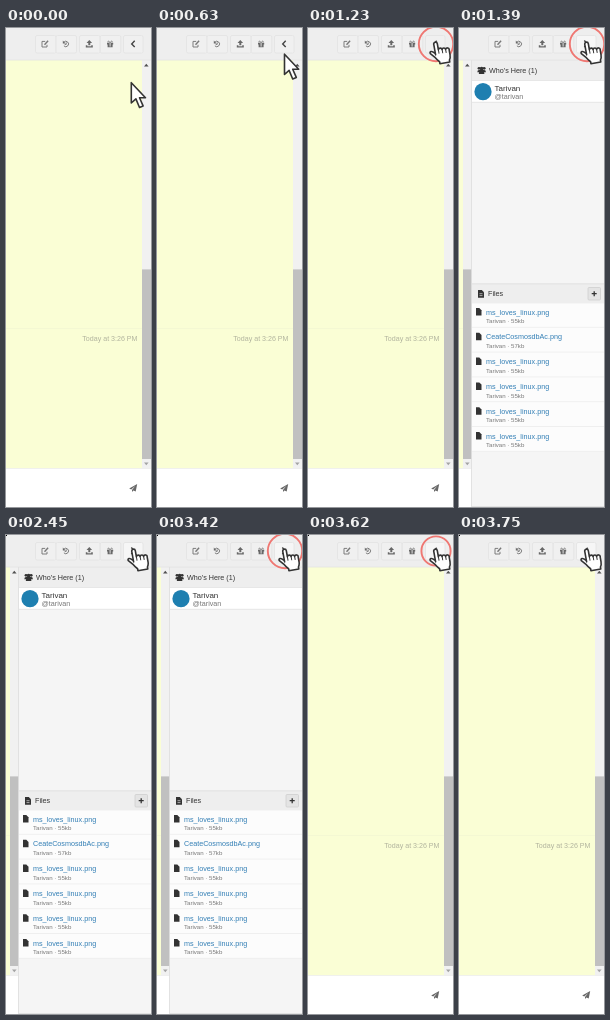
Animation, 145 px wide and 479 px high, one loop 4430 ms. Source, as an HTML page:

```html
<!DOCTYPE html>
<html lang="en">
<head>
<meta charset="utf-8">
<title>Chat side panel</title>
<style>
  html, body { margin: 0; width: 100%; height: 100%; overflow: hidden; background: #fff; }
  svg { display: block; width: 100%; height: 100%; }
  text { font-family: "Liberation Sans", Arial, sans-serif; font-size: 7.2px; fill: #333; }
  .line { fill: none; stroke: #777; stroke-width: .95; }
  .solid { fill: #686868; }
  .button { fill: #f0f0f0; stroke: #e3e3e3; stroke-width: .8; }
  .link { fill: #337fb5; }
  .small { font-size: 6.1px; fill: #777; }
  .pointer { fill: #fff; stroke: #333; stroke-width: 1.6; stroke-linejoin: round; }
</style>
</head>
<body>
<svg viewBox="0 0 145 479" preserveAspectRatio="none">
  <rect width="145" height="479" fill="#fff"/>

  <g id="chat">
    <rect y="32" width="136" height="408.5" fill="#fafed5"/>
    <path d="M0 300.5H136" stroke="#f4f8d3"/>
    <text x="76.3" y="312.5" style="font-size:7.1px;fill:#b2b49e">Today at 3:26 PM</text>
    <rect x="136" y="32" width="9" height="408.5" fill="#f1f1f1"/>
    <rect x="136" y="241.4" width="9" height="189.6" fill="#c0c0c0"/>
    <path d="M138 38.5l2.3-2.8 2.3 2.8z" fill="#505050"/>
    <path d="M138 434.4l2.3 2.8 2.3-2.8z" fill="#a3a3a3"/>
    <path d="M0 440.5H145" stroke="#eee" stroke-width=".8"/>
    <path class="solid" d="M131.2 456l-8 4.6 2 .9 4-3.5-3.2 4v2l1.4-1.5 2.3 1z"/>
  </g>

  <g id="panel">
    <rect x="12.5" y="32" width="134" height="446.5" fill="#f5f5f5" stroke="#ddd" stroke-width=".8"/>
    <rect x="13" y="32.5" width="132" height="20" fill="#eee"/>
    <rect x="13" y="52.5" width="132" height="21.5" fill="#fff"/>
    <path d="M13 52.5H145M13 74.3H145" stroke="#e4e4e4" stroke-width=".8"/>
    <g fill="#333">
      <circle cx="20" cy="40.3" r="1.4"/><circle cx="25.2" cy="40.3" r="1.4"/>
      <circle cx="22.6" cy="40.6" r="1.9"/>
      <path d="M18.3 44.3q0-2.4 1.7-2.4h5.2q1.7 0 1.7 2.4z"/>
      <path d="M19.8 46q0-3.3 2.8-3.3t2.8 3.3z"/>
    </g>
    <text x="30" y="44.8">Who's Here (1)</text>
    <circle cx="24" cy="63.7" r="8.6" fill="#1e7fb0"/>
    <text x="35.5" y="62.5" style="font-size:8px">Tarivan</text>
    <text x="35.5" y="71" style="fill:#777">@tarivan</text>

    <rect x="13" y="256" width="132" height="19.5" fill="#eee"/>
    <path d="M13 255.8H145" stroke="#ddd" stroke-width=".8"/>
    <path d="M19 262h3.8l2.2 2.2v5.6h-6z" fill="#333"/>
    <path d="M20.5 265.7h3M20.5 267.6h3" stroke="#ddd" stroke-width=".7"/>
    <text x="29" y="268.4">Files</text>
    <rect x="129" y="259.5" width="12.5" height="12.5" rx="1" fill="#e4e4e4" stroke="#ccc" stroke-width=".7"/>
    <path d="M132.7 265.7h5M135.2 263.2v5" stroke="#333" stroke-width="1.3"/>
    <rect x="13" y="275.5" width="132" height="148" fill="#fcfcfc"/>
    <g id="files"></g>
  </g>

  <rect width="145" height="32" fill="#eee"/>
  <path d="M0 32H145" stroke="#e2e2e2" stroke-width=".8"/>
  <g id="buttons"></g>
  <rect id="toggle" class="button" x="117.5" y="7.5" width="19.5" height="17.5" rx="1.5"/>
  <path class="line" d="M41 16.8v2.2h-5v-5.6h3.2"/>
  <path class="line" d="M38.5 16.8l3.6-4" style="stroke-width:1.4"/>
  <path class="line" d="M57.8 14.2a2.7 2.7 0 1 1 .1 3.7M60.2 14.4v2h-1.5"/>
  <path class="solid" d="M56.8 12.6v2.8h2.8z"/>
  <path class="solid" d="M83.3 12l2.8 3.1h-1.8v2.1h-2v-2.1h-1.8zM79.8 17.2h1.6v1h3.8v-1h1.6v2.2h-7z"/>
  <path class="solid" d="M101 14.8h6.2v1.7h-.6v2.7h-5v-2.7h-.6z"/>
  <path class="line" d="M104.1 14.7c-1-2.2-2.6-1.7-2.1-.4M104.1 14.7c1-2.2 2.6-1.7 2.1-.4"/>
  <path d="M104.1 15v3.6" stroke="#eee" stroke-width=".9"/>
  <path id="chevron" class="line" style="stroke:#444;stroke-width:1.4"/>

  <circle id="ring" cx="128" cy="16" fill="none" stroke="#ef7772" stroke-width="1.9"/>
  <path id="arrow" class="pointer" d="M0 0V20.3L4.6 16.2 8.2 24.8 11.8 23.2 8.2 15H14.2z"/>
  <g id="hand">
    <g transform="translate(1 .7) rotate(-10 130 24)">
      <path class="pointer" d="M126.3 25.5V14.8a1.8 1.8 0 0 1 3.6 0V21a1.9 1.9 0 0 1 3.7 .4a1.8 1.8 0 0 1 3.5 .6a1.7 1.7 0 0 1 3.4 1V28q0 3-1.5 5V35H129V33q-2-2-4-5.5L121.3 23.5q-.5-1.8 1-2q1.3-.1 4 2.7z"/>
      <path d="M129.9 21v4M133.6 21.5v3.7M137.1 22.3v3.2" fill="none" stroke="#333"/>
    </g>
  </g>
  <rect id="corner" width="1" height="1" fill="#000"/>
</svg>
<script>
const LOOP = 4430;
const el = id => document.getElementById(id);
const between = (t, from, to) => t >= from && t < to;
const show = (id, on) => el(id).setAttribute("display", on ? "inline" : "none");
const move = (id, x, y) => el(id).setAttribute("transform", `translate(${x} ${y})`);
const latest = (stops, t) => stops.filter(stop => t >= stop[0]).pop();

el("buttons").innerHTML = [29.5, 50, 73.5, 94.3].map(x =>
  `<rect class="button" x="${x}" y="7.5" width="20.5" height="17.5" rx="1.5"/>`).join("");

el("files").innerHTML = Array.from({ length: 6 }, (_, i) => {
  const [name, size] = i === 1 ? ["CeateCosmosdbAc.png", 57] : ["ms_loves_linux.png", 55];
  return `<g transform="translate(0 ${i * 24.8})">
    <path d="M17 280h3.3l2.2 2.2v5.3h-5.5z" fill="#333"/>
    <text class="link" x="27" y="286.5">${name}</text>
    <text class="small" x="27" y="295.3">Tarivan · ${size}kb</text>
    <path d="M13 299.3H145" stroke="#ececec" stroke-width=".8"/></g>`;
}).join("");

// Start time and tip of the arrow pointer
const arrowStops = [[0, 125.3, 54.7], [480, 128.8, 34.7], [630, 127.5, 26.2]];
// Start time and radius of the click ring
const ringStops = [[0, 0], [1230, 17.2], [1520, 14.6], [1650, 0], [3420, 17.2], [3620, 14.6], [3750, 0]];

function draw(t) {
  const open = between(t, 1390, 3620);
  const hovering = t >= 790;
  move("chat", open ? -132 : 0, 0);
  show("panel", open);
  show("corner", t >= 2450);

  const radius = latest(ringStops, t)[1];
  show("ring", radius > 0);
  el("ring").setAttribute("r", radius);

  el("toggle").style.fill = t < 1390 ? "#f0f0f0" : "#f6f6f6";
  el("chevron").setAttribute("d", open ? "M125.3 12.5l3 3.2-3 3.2" : "M128.7 12.7l-3 3.2 3 3.2");

  show("arrow", !hovering);
  show("hand", hovering);
  const [, x, y] = latest(arrowStops, t);
  move("arrow", x, y);
  move("hand", 0, t < 920 ? 4 : 0);
}

const start = performance.now();
function tick() {
  draw((performance.now() - start) % LOOP);
  requestAnimationFrame(tick);
}
draw(0);
requestAnimationFrame(tick);
</script>
</body>
</html>
```
